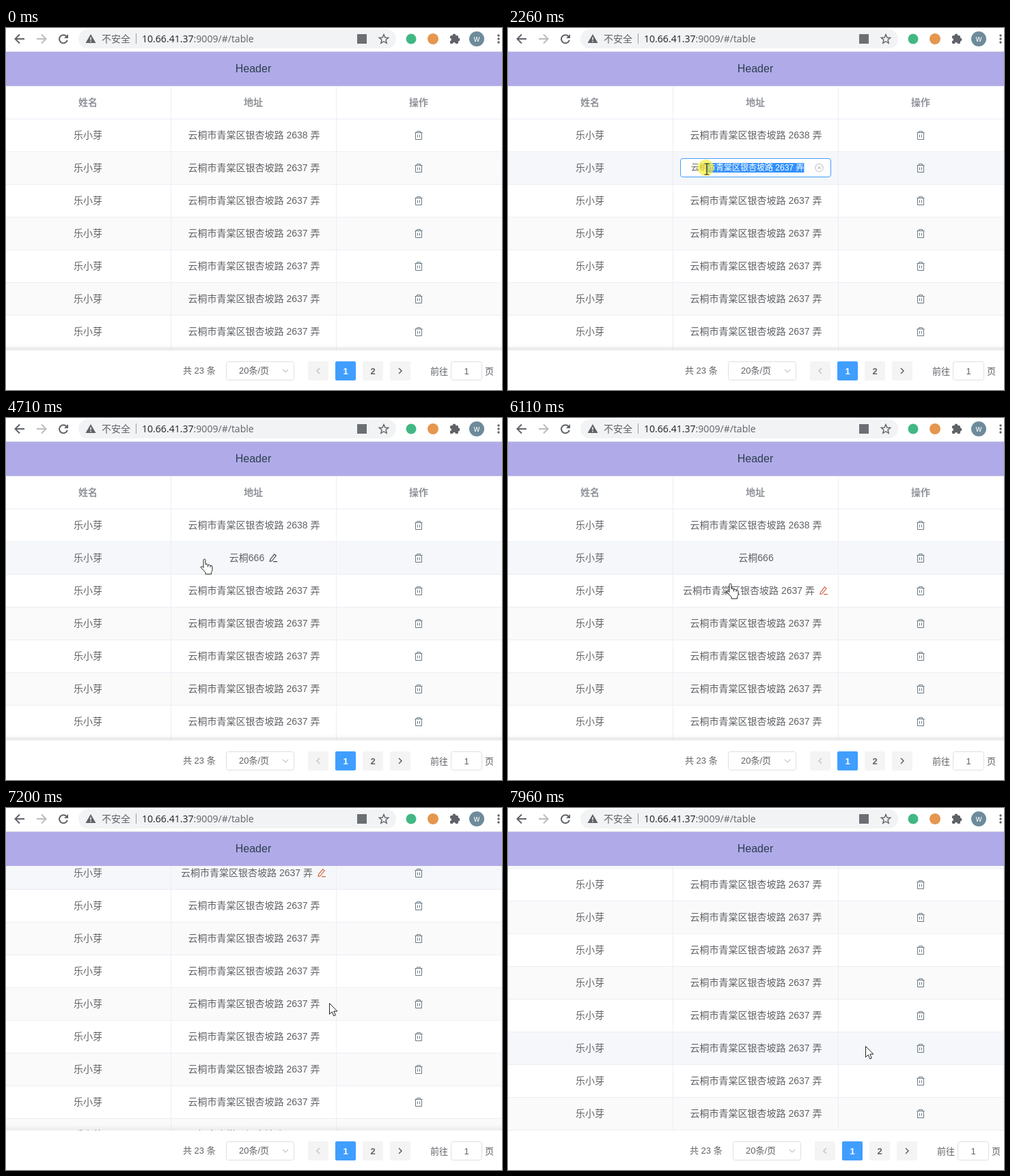
An HTML page for the animation above (8000 ms loop, 726x531 px).

```html
<!DOCTYPE html>
<html lang="zh">
<head>
<meta charset="utf-8">
<title>Editable table</title>
<style>
  html, body { margin: 0; width: 100%; height: 100%; overflow: hidden; background: #fff; }
  svg { display: block; width: 726px; height: 531px; font: 14px "Liberation Sans", "Noto Sans CJK SC", "Noto Sans CJK", sans-serif; }
  text { fill: #606266; white-space: pre; }
  .mid { text-anchor: middle; }
  .head { font-weight: bold; fill: #909399; }
  .url { font: 14.07px "Open Sans", "Noto Sans", "Noto Sans CJK SC", sans-serif; fill: #5f6368; }
  .line { fill: #ebeef5; }
  .icon { fill: none; stroke: #5f6368; stroke-width: 2; }
  .thin { fill: none; stroke: #c0c4cc; stroke-width: 1.1; }
  .box { fill: #fff; stroke: #dcdfe6; }
  #pager { font-size: 13px; }
  #field { font-size: 12px; }
</style>
</head>
<body>
<svg viewBox="0 0 726 531">
  <defs>
    <path id="trash" fill="none" stroke="#6b7882" d="M.5 2.5h11M3.5 2.500V.5h5v2M1.500 2.500v10h9v-10M4.500 5.500v4M7.500 5.500v4"/>
    <path id="pencil" d="M1.5 8.6 7.6.8l2.6 2-6.1 7.8-3 .9zM6 11.6h6" fill="none" stroke-width="1.1"/>
    <linearGradient id="shade" x2="0" y2="1">
      <stop offset="0" stop-opacity="0"/><stop offset="1" stop-opacity=".06"/>
    </linearGradient>
    <clipPath id="selClip"><rect id="selClipBox" y="190" height="30"/></clipPath>
  </defs>

  <g id="table">
    <g id="scroller"></g>
    <path d="M241.5 85V473M483.5 85V473M725.5 85V473" stroke="#ebeef5"/>
    <rect id="shadow" y="464" width="726" height="9" fill="url(#shade)"/>
  </g>

  <g id="field">
    <rect id="fieldBox" x="252.5" y="191.5" width="220" height="27" rx="3.5" fill="#fff"/>
    <text id="fieldText" x="268" y="209"></text>
    <g id="selection">
      <rect id="selBox" y="198" height="14" fill="#3391fb"/>
      <text id="selText" x="268" y="209" style="fill:#fff" clip-path="url(#selClip)"></text>
    </g>
    <rect id="caret" y="198.5" width="1" height="13" fill="#333"/>
    <circle class="thin" cx="455.5" cy="205" r="5.7"/>
    <path class="thin" d="m453.3 202.8 4.4 4.4m0-4.4-4.4 4.4"/>
  </g>

  <!-- browser bar -->
  <rect width="726" height="35" fill="#fff"/>
  <rect x="106" y="2" width="465" height="28" rx="14" fill="#f1f3f4"/>
  <path class="icon" d="M27 16H14M20 9.5 13.5 16l6.5 6.5"/>
  <path class="icon" d="M45 16h13M52 9.5 58.5 16 52 22.5" style="stroke:#babcbe"/>
  <path class="icon" d="M88.5 12.2a6 6 0 1 0 1.3 5.5"/>
  <path d="M91 9v6h-6z" fill="#5f6368"/>
  <path d="M124 9l7.5 13h-15z" fill="#5f6368"/>
  <path d="M124 13.5v4M124 18.8v1.6" stroke="#f1f3f4" stroke-width="1.5"/>
  <text class="url" x="140" y="21" style="font-size:14px">不安全</text>
  <rect x="190" y="8" width="1" height="15" fill="#9aa0a6"/>
  <text class="url" x="199" y="21"><tspan fill="#202124">10.66.41.37</tspan>:9009/#/table</text>
  <rect x="514" y="9" width="14" height="14" fill="#6b6f73"/>
  <path class="icon" style="stroke-width:1.4" d="M553 9.5l1.9 4.5 4.8.4-3.7 3.1 1.2 4.8-4.2-2.6-4.2 2.6 1.2-4.8-3.7-3.1 4.8-.4z"/>
  <circle cx="593" cy="16" r="7.5" fill="#41b883"/>
  <circle cx="625" cy="16" r="8" fill="#e5964f"/>
  <g fill="#5f6368">
    <rect x="650" y="11" width="12" height="12" rx="1.5"/>
    <circle cx="656" cy="11" r="2.4"/><circle cx="662" cy="17" r="2.4"/>
    <g fill="#fff"><circle cx="650" cy="17" r="2"/><circle cx="656" cy="23" r="2"/></g>
    <circle cx="721" cy="11" r="1.7"/><circle cx="721" cy="16" r="1.7"/><circle cx="721" cy="21" r="1.7"/>
  </g>
  <circle cx="689" cy="16" r="11" fill="#6d8b9a"/>
  <text class="mid" x="689" y="19.5" style="fill:#fff;font-size:12px">w</text>
  <rect y="34" width="726" height="1" fill="#e4e4e8"/>
  <rect y="35" width="726" height="50" fill="#b0abe8"/>
  <text class="mid" x="362" y="65" style="font-size:16px;fill:#2c3e50">Header</text>

  <!-- footer -->
  <rect y="473" width="726" height="58" fill="#fff"/>
  <g id="pager">
    <text x="259" y="507">共 23 条</text>
    <rect class="box" x="322.5" y="489.5" width="99" height="27" rx="3"/>
    <text x="341" y="507">20条/页</text>
    <path class="thin" d="m405 501 4 4 4-4"/>
    <g fill="#f4f4f5">
      <rect x="442" y="489" width="30" height="28" rx="2"/>
      <rect x="522" y="489" width="30" height="28" rx="2"/>
      <rect x="562" y="489" width="30" height="28" rx="2"/>
    </g>
    <rect x="482" y="489" width="30" height="28" rx="2" fill="#409eff"/>
    <path class="thin" d="m459 499-4 4 4 4" style="stroke-width:1.5"/>
    <path class="thin" d="m575 499 4 4-4 4" style="stroke:#606266;stroke-width:1.5"/>
    <text class="mid" x="497" y="507.5" font-weight="bold" style="fill:#fff">1</text>
    <text class="mid" x="537" y="507.5" font-weight="bold">2</text>
    <text x="621" y="507.5">前往</text>
    <rect class="box" x="651.5" y="489.5" width="45" height="27" rx="3"/>
    <text class="mid" x="674" y="507.5">1</text>
    <text x="701" y="507.5">页</text>
  </g>

  <circle id="press" r="12" fill="#f8ee2c"/>
  <g id="cursor">
    <path id="arrow" d="M.5.5v16l3.7-3.5 2.6 6 2.6-1.2-2.6-5.7h5z" fill="#fff" stroke="#222"/>
    <path id="hand" d="M-2 1.5q0-1.5 1.5-1.5t1.5 1.5v6q3-1 3.5 1q3-.8 3.5 1q3-.5 3 2v4q0 2-1.5 4v2.5h-8.5v-2.5l-7-7.5q.5-2 2.5-1l1.500 1.500zM4.5 8.500v3M8 9.500v2.500" fill="#fff" stroke="#222"/>
    <path id="ibeam" d="M-3.5-8h7M-3.5 8h7M0-8V8" fill="none" stroke="#222" stroke-width="1.2"/>
  </g>
</svg>

<script>
const $ = id => document.getElementById(id);
const LOOP = 8000, ROW = 48, TOP = 134, ROWS = 20, END = 621;
const NAME = '乐小芽', CITY = '云桐';
const address = number => `${CITY}市青棠区银杏坡路 ${number} 弄`;

// Bursts of movement: start, end, number of steps
const BURSTS = [[110, 850, 11], [930, 1700, 10], [1850, 2260, 6], [6110, 6650, 8], [6950, 7730, 11], [7800, 7960, 3]];
const POINTER = [
  [110, 601, 316], [850, 460, 203], [930, 460, 206], [1187, 416, 206], [1700, 437, 206], [1850, 437, 206],
  [2260, 291, 207], [6110, 326, 243], [6419, 425, 307], [6650, 473, 286], [7652, 473, 286], [7730, 485, 300],
  [7800, 497, 318], [7960, 523, 349]];
const SCROLL = [[6872, 0], [7184, 206], [7652, END]];

function el(name, attrs, parent, content = '') {
  const node = document.createElementNS('http://www.w3.org/2000/svg', name);
  set(node, attrs);
  node.textContent = content;
  return parent.appendChild(node);
}
function set(node, attrs) {
  for (const key in attrs) node.setAttribute(key, attrs[key]);
}
function show(node, visible) {
  node.setAttribute('visibility', visible ? 'visible' : 'hidden');
}

function stepTime(t) {
  const burst = BURSTS.findLast(b => b[0] <= t);
  if (!burst) return 0;
  const [start, end, count] = burst, step = (end - start) / (count - 1);
  return Math.min(end, start + Math.floor((t - start) / step + 1e-6) * step);
}
function track(keys, t) {
  const next = keys.findIndex(k => k[0] > t);
  if (next === 0) return keys[0].slice(1);
  if (next < 0) return keys.at(-1).slice(1);
  const a = keys[next - 1], b = keys[next], p = (t - a[0]) / (b[0] - a[0]);
  return a.slice(1).map((v, i) => Math.round(v + (b[i + 1] - v) * p));
}

function buildRow(index) {
  const g = el('g', { transform: `translate(0 ${TOP + index * ROW})` }, $('scroller'));
  const back = el('rect', { width: 726, height: ROW }, g);
  el('rect', { class: 'line', y: ROW - 1, width: 726, height: 1 }, g);
  el('text', { class: 'mid', x: 120, y: 28 }, g, NAME);
  const text = el('text', { class: 'mid', y: 28 }, g);
  const pencil = el('use', { href: '#pencil', y: 17 }, g);
  el('use', { href: '#trash', x: 598, y: 17 }, g);
  return { back, text, pencil };
}

el('rect', { class: 'line', y: 85, width: 726, height: 1 }, $('scroller'));
el('rect', { class: 'line', y: 133, width: 726, height: 1 }, $('scroller'));
['姓名', '地址', '操作'].forEach((label, i) =>
  el('text', { class: 'mid head', x: 120 + 242 * i, y: 114 }, $('scroller'), label));
const rows = Array.from({ length: ROWS }, (_, i) => buildRow(i));

// Character edges of the field text, used to snap the selection
const fullText = address(2637);
$('fieldText').textContent = $('selText').textContent = fullText;
const edges = [...fullText].map((_, i) => $('fieldText').getStartPositionOfChar(i).x);
const textEnd = 268 + $('fieldText').getComputedTextLength();
edges.push(textEnd);

function hoveredRow(t) {
  if (t < 110) return -1;
  const y = track(POINTER, stepTime(t))[1];
  return Math.floor((y - TOP + (t >= 7730 ? END : 0)) / ROW);
}

function drawTable(t, x) {
  const scroll = track(SCROLL, stepTime(t))[0], atEnd = scroll === END;
  set($('scroller'), { transform: `translate(0 ${-scroll})` });
  set($('pager'), { transform: `translate(${atEnd ? 7 : 0} 0)` });
  show($('shadow'), !atEnd);

  const editing = t >= 930 && t < 4710, saved = t >= 4710;
  const hover = hoveredRow(t), tinted = hoveredRow(t - 80);
  rows.forEach(({ back, text, pencil }, i) => {
    const active = i === hover && x > 241 && x < 484 && !editing;
    const label = i === 1 && saved ? CITY + '666' : address(i ? 2637 : 2638);
    const center = active ? 352.5 : 363;
    if (text.textContent !== label) text.textContent = label;
    set(text, { x: center });
    set(back, { fill: i === tinted ? '#f5f7fa' : i % 2 ? '#fafafa' : '#fff' });
    show(text, !(editing && i === 1));
    show(pencil, active);
    if (active) set(pencil, {
      x: center + text.getComputedTextLength() / 2 + 7,
      stroke: i === 1 && saved ? '#444' : '#d0623f'
    });
  });
}

function drawField(t, x) {
  const editing = t >= 930 && t < 4710, selecting = editing && t >= 1850 && t < 3250;
  show($('field'), editing);
  set($('fieldBox'), { stroke: t >= 1850 ? '#409eff' : '#c0c4cc' });

  const typed = [3860, 4010, 4180].filter(time => t >= time).length;
  $('fieldText').textContent = t < 3250 ? fullText : CITY + '6'.repeat(typed);

  const left = edges.reduce((best, e) => Math.abs(e - x) < Math.abs(best - x) ? e : best);
  for (const id of ['selBox', 'selClipBox']) set($(id), { x: left, width: textEnd - left });
  show($('selection'), selecting);

  show($('caret'), editing && t >= 3250 && !(t >= 3780 && t < 3860));
  set($('caret'), { x: Math.round(268 + $('fieldText').getComputedTextLength()) });
}

function drawPointer(t, x, y) {
  const hidden = t < 110 || (t >= 2780 && t < 4710);
  const kind = hidden ? '' : t >= 930 && t < 2780 ? 'ibeam' : x < 470 ? 'hand' : 'arrow';
  for (const id of ['arrow', 'hand', 'ibeam']) show($(id), id === kind);
  set($('cursor'), { transform: `translate(${x} ${y})` });
  set($('press'), { cx: x - 1.5, cy: y - 2, opacity: t < 2540 ? 0.65 : 0.32 });
  show($('press'), t >= 1850 && t < 2620);
}

function frame(now) {
  const t = now % LOOP;
  const [x, y] = track(POINTER, stepTime(t));
  drawTable(t, x);
  drawField(t, x);
  drawPointer(t, x, y);
}

let origin;
function tick(now) {
  origin ??= now;
  frame(now - origin);
  requestAnimationFrame(tick);
}
frame(0);
requestAnimationFrame(tick);
</script>
</body>
</html>
```
